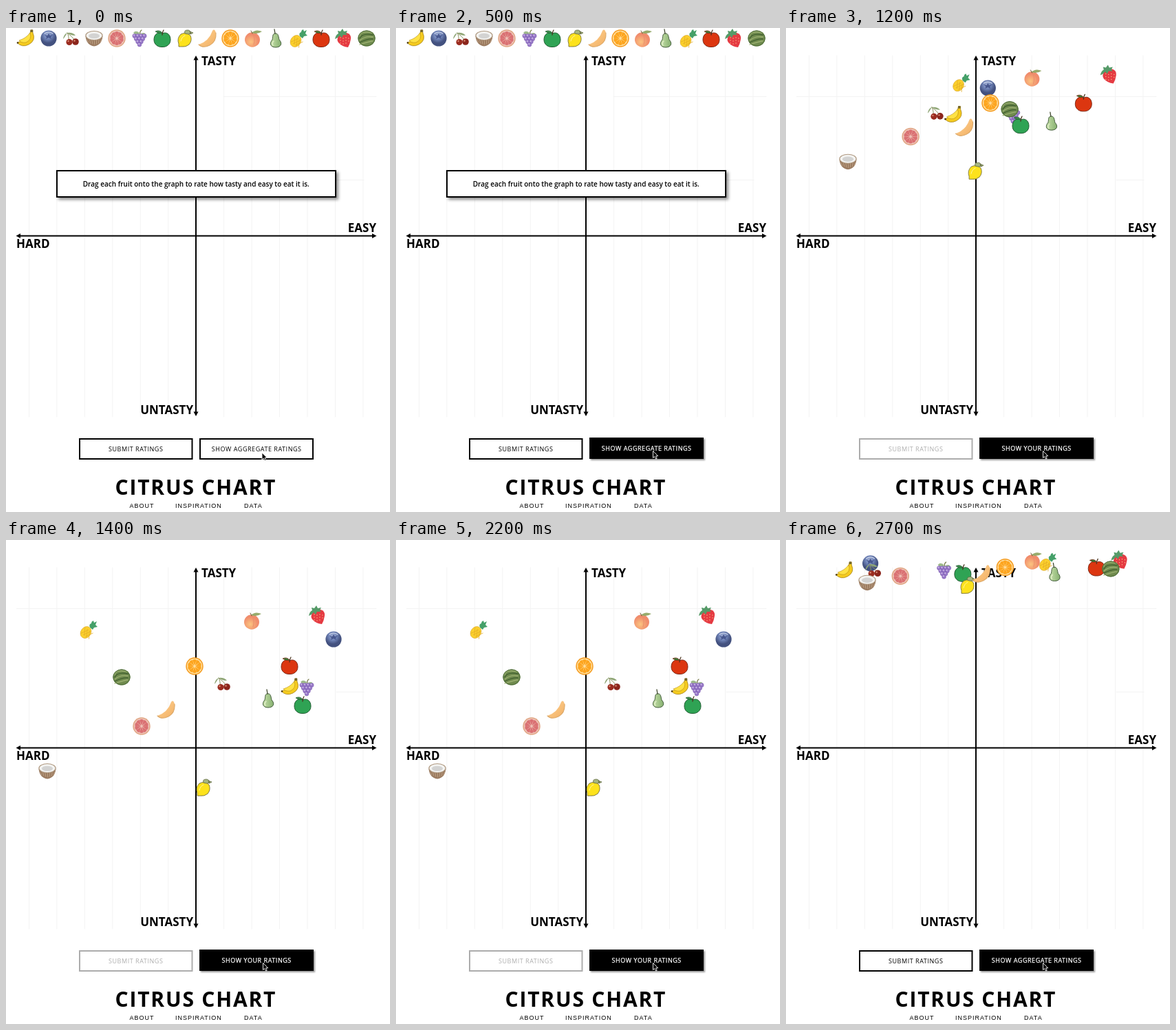
These frames come from a looping animation (558x702 px, 2.8 s). An HTML page:

```html
<!DOCTYPE html>
<html lang="en">
<head>
<meta charset="utf-8">
<title>Citrus Chart</title>
<style>
html, body { margin: 0; width: 100%; height: 100%; overflow: hidden; background: #fff; }
svg { display: block; }
text { font-family: "Open Sans", sans-serif; fill: #000; }
.axis { font-size: 17px; font-weight: 700; }
.label { font-size: 9px; letter-spacing: .55px; text-anchor: middle; }
.nav text { font: 9px "Liberation Sans", Arial, sans-serif; letter-spacing: 1px; }
.raised { filter: drop-shadow(3px 3px 2px rgba(0,0,0,.45)); }
</style>
</head>
<body>
<svg id="stage" width="558" height="702" viewBox="0 0 558 702">
  <defs>
    <radialGradient id="berry" cx=".45" cy=".3"><stop stop-color="#a9b6d8"/><stop offset=".5" stop-color="#7084b8"/><stop offset="1" stop-color="#43517f"/></radialGradient>
    <radialGradient id="peach" cx=".4" cy=".65"><stop stop-color="#fbc480"/><stop offset="1" stop-color="#f08c6c"/></radialGradient>
    <linearGradient id="melon" x2="1" y2="1"><stop stop-color="#fdd294"/><stop offset="1" stop-color="#f3b063"/></linearGradient>
    <linearGradient id="pear" x2="1"><stop stop-color="#c5dfa8"/><stop offset="1" stop-color="#86b070"/></linearGradient>
  </defs>
  <rect width="558" height="702" fill="#fff"/>
  <g id="grid"></g>
  <path id="leftRule" d="M15 99.500H316" stroke="#f3f3f3"/>
  <path d="M276 44V560M18 301.500H535" stroke="#000" stroke-width="2"/>
  <path d="M276 40l3.500 6.500h-7zM276 563l3.500-6.500h-7zM14.500 301.500l6.500-3.500v7zM538.500 301.500l-6.500-3.500v7z"/>
  <g class="axis">
    <text x="284" y="54">TASTY</text>
    <text x="538" y="296" text-anchor="end">EASY</text>
    <text x="15" y="319">HARD</text>
    <text x="272" y="559.500" text-anchor="end">UNTASTY</text>
  </g>
  <g id="hint">
    <rect class="raised" x="74" y="207" width="405" height="38" fill="#fff" stroke="#000" stroke-width="2"/>
    <text x="276.300" y="230" font-size="10" font-weight="600" text-anchor="middle">Drag each fruit onto the graph to rate how tasty and easy to eat it is.</text>
  </g>
  <g id="fruits"></g>
  <g id="submit">
    <rect x="107" y="596" width="163.500" height="29" fill="none" stroke="#000" stroke-width="2"/>
    <text class="label" x="188.700" y="614">SUBMIT RATINGS</text>
  </g>
  <g id="toggle">
    <rect x="282" y="596" width="164" height="29" stroke="#000" stroke-width="2"/>
    <text class="label" x="364.200" y="614"></text>
  </g>
  <path id="cursor" d="M0 0V10L2.300 8 4 11.500 5.700 10.800 4.200 7.300H7.200Z" fill="#000" stroke="#fff" stroke-width=".9"/>
  <text x="158.500" y="677" font-size="30" font-weight="700" letter-spacing="1.800">CITRUS CHART</text>
  <g class="nav">
    <text x="179.500" y="696">ABOUT</text>
    <text x="246" y="695.500">INSPIRATION</text>
    <text x="346" y="696">DATA</text>
  </g>
</svg>
<script>
const $ = id => document.getElementById(id);
const range = (n, f) => Array.from({ length: n }, (_, i) => f(i)).join('');
const path = (d, fill, more = '') => `<path d="${d}" fill="${fill}" ${more}/>`;
const oval = (x, y, rx, ry, fill, more = '') =>
  `<ellipse cx="${x}" cy="${y}" rx="${rx}" ry="${ry}" fill="${fill}" ${more}/>`;
const dot = (x, y, r, fill, more) => oval(x, y, r, r, fill, more);
const line = (d, color, w = 1) => path(d, 'none', `stroke="${color}" stroke-width="${w}" stroke-linecap="round"`);
const ink = (color, w = 1) => `stroke="${color}" stroke-width="${w}"`;

const citrus = (rind, pith, flesh, n) =>
  dot(0, 0, 12.7, rind) + dot(0, 0, 11.2, pith) +
  range(n, i => path('M0 -1.2L2.9 -8.8Q0 -11.2 -2.9 -8.8Z', flesh, `transform="rotate(${i * 360 / n})"`));

const apple = (body, edge, leaf) =>
  path('M0 -7C-6 -10 -12 -6 -12 2C-12 9 -6 13 0 12.5C6 13 12 9 12 2C12 -6 6 -10 0 -7Z', body, ink(edge)) +
  line('M0 -5Q0 -9 2 -12', '#4b3420', 1.3) +
  path('M0 -8Q-4 -13 -10 -10Q-5 -6 0 -8Z', leaf, ink(edge, .7));

const banana =
  path('M-13 6Q0 4 6 -8L7 -12L10 -12L10 -8Q15 3 4 9Q-6 14 -13 6Z', '#f5cb1f', ink('#9a7718', .7)) +
  path('M-10 3Q0 0 6 -8Q9 2 0 6Q-7 7 -10 3Z', '#ffe245', ink('#b58c15', .6)) +
  path('M6.500 -9V-12.500H10V-9Z', '#74672a') + dot(-12, 6.5, 1.3, '#4c3b18');

const blueberry =
  dot(0, 0, 11.6, 'url(#berry)') +
  path('M-6 -5L-2 -4L0 -7L2 -4L6 -5L3 -2L4 1L0 -1L-4 1L-3 -2Z', '#48588f') +
  line('M-6 -7Q0 -11 6 -7', '#cdd6ea', 1.2);

const cherries =
  line('M-4 5Q-3 -3 -6 -8M6 4Q1 -3 -6 -8', '#8b9160') +
  path('M-6 -8Q-10 -1 -12 1Q-11 -6 -6 -8ZM-6 -8Q2 -9 6 -4Q-1 -4 -6 -8Z', '#8fa676') +
  dot(-3, 5.5, 4.6, '#9b2c20') + dot(6, 5, 4.8, '#8b251c') +
  dot(-4.5, 4, 1.2, '#d98a72') + dot(4.5, 3.5, 1.2, '#d98a72');

const coconut =
  path('M-12.500 -3Q-11 10 0 11.500Q11 10 12.500 -3Z', '#9b7b60') +
  range(7, i => line(`M${i * 3.4 - 10} 2l${2 - i * .5} ${7 - Math.abs(i - 3)}`, '#c4a98c', .8)) +
  oval(0, -4, 12.7, 7, '#b09a82') + oval(0, -4, 11.5, 6, '#f4f4f2') + oval(0, -3.5, 8, 3.8, '#d3d3d2');

const grapes =
  line('M1 -6Q0 -10 3 -12', '#7c8050', 1.3) +
  path('M1 -7Q-5 -13 -9 -8Q-6 -4 1 -7ZM2 -7Q8 -10 9 -5Q5 -3 2 -7Z', '#9fbb8b') +
  range(4, r => range(4 - r, c => {
    const x = c * 4.8 - (3 - r) * 2.4, y = r * 4.2 - 3.5;
    return dot(x, y, 2.9, '#9b7cca', ink('#7657ad', .6)) + dot(x - .8, y - 1, 1, '#d3c1ea');
  }));

const lemon =
  path('M-9 8Q-12 0 -6 -6Q2 -10 8 -4Q11 3 6 9Q1 13 -4 12L-9 12Z', '#fde21c', ink('#77713c', .9)) +
  path('M0 -7Q-2 -12 4 -12Q8 -12 9 -7Q5 -5 0 -7ZM7 -10L12 -8L8 -6Z', '#a5b581', ink('#626b40', .8)) +
  line('M-6 4Q-5 -2 0 -4', '#fff6a0');

const melon =
  path('M-13 9Q2 4 7 -11Q10 -15 12 -8Q13 5 3 10Q-7 15 -13 9Z', 'url(#melon)') +
  line('M-13 9Q-7 15 3 10Q13 5 12 -8', '#dba869', 1.1);

const peach =
  oval(-1, 2, 11, 10.7, 'url(#peach)') +
  line('M-1 -8Q4 0 1 9', '#e98f6b', 1) +
  path('M-2 -8Q4 -14 13 -10Q6 -5 -2 -8Z', '#98ab6c') + line('M-1 -7L-3 -11', '#76603b');

const pear =
  path('M-1 -7C4 -8 4 -2 5 2C10 7 8 13 0 13C-9 13 -9 6 -5 2C-4 -2 -5 -7 -1 -7Z', 'url(#pear)', ink('#425b3b')) +
  line('M-1 -7L-2 -13', '#3f482e', 1.3) + line('M-3 4Q-6 7 -4 10', '#e5f0cc', 1.3);

const pineapple =
  path('M2 -3Q0 -8 4 -9Q4 -12 7 -13L8 -10L12 -12L10 -7L13 -4L8 -3L6 0Z', '#45a069') +
  `<g transform="rotate(35 -4 4)">${oval(-4, 4, 7.3, 9, '#fbd02c', ink('#dba42a', .6))}` +
  range(3, i => line(`M${i * 4 - 9} -1l6 10M${i * 4 - 3} -1l-6 10`, '#e3ac27', .7)) + '</g>';

const strawberry =
  path('M-8 -3Q-4 -9 4 -8Q11 -6 10 1Q9 8 6 13Q-3 12 -8 6Q-11 2 -8 -3Z', '#e53a42') +
  range(11, i => dot(-5 + i % 4 * 4, -1 + (i >> 2) * 4 + i % 2, .65, '#ffc48a')) +
  path('M-13 1Q-12 -5 -8 -7L-9 -11L-5 -10L-2 -14L0 -10L5 -11L3 -7L5 -5L-1 -5L-3 -1L-6 -4L-9 -1Z', '#559a68');

const watermelon =
  oval(0, 0, 12.6, 11.5, '#708b4e') +
  range(5, i => line(`M-10 ${i * 3 - 3}Q${i * 4 - 10} ${i * 4 - 12} 9 ${i * 3 - 8}`, i % 2 ? '#3e5d2e' : '#9db173', 1.3)) +
  oval(0, 0, 12.1, 11, 'none', ink('#4c6b38', 1));

// Rated position, then artwork
const items = [
  [413, 213, banana], [476, 144, blueberry], [315, 208, cherries], [60, 335, coconut],
  [197, 270, citrus('#e0a583', '#efc5b9', '#da7173', 10)], [437, 214, grapes],
  [431, 239, apple('#2fa354', '#225b32', '#3a8a49')], [287, 359, lemon], [233, 246, melon],
  [274, 183, citrus('#f59a1c', '#ffe0a3', '#fda51f', 10)], [358, 117, peach],
  [381, 230, pear], [120, 130, pineapple],
  [412, 182, apple('#dc3610', '#7d2815', '#3c7b37')], [453, 109, strawberry], [168, 199, watermelon]
];

$('fruits').innerHTML = items.map(f => `<g>${f[2]}</g>`).join('');
$('grid').innerHTML = range(13, i => line(`M${33.5 + i * 40.45} 40V564`, '#f3f3f3')) +
  line('M316 99.500H538M480 220.500H520', '#f3f3f3');

const LOOP = 2800, MOVE = 400, OPEN = 985, CLOSE = 2400;
const clamp = v => Math.max(0, Math.min(1, v));
const swing = v => .5 - Math.cos(Math.PI * clamp(v)) / 2;
const within = (t, a, b) => t >= a && t < b;
const tone = v => `rgb(${v},${v},${v})`;

const nodes = [...$('fruits').children];
const [box, caption] = $('toggle').children;

function draw(t) {
  const k = swing((t - OPEN) / MOVE) - swing((t - CLOSE) / MOVE);
  items.forEach(([x, y], i) => {
    const home = 29 + 33 * i;
    nodes[i].setAttribute('transform', `translate(${home + (x - home) * k} ${15 + (y - 15) * k})`);
  });

  const rated = within(t, OPEN, CLOSE);
  const pressed = within(t, 800, 1000) || within(t, 2300, 2400);
  const hover = clamp(t / 200);
  const shade = Math.round(255 * (1 - hover));
  const depth = pressed ? 1 : 2;

  $('hint').style.display = t < OPEN ? '' : 'none';
  $('leftRule').style.display = t < 700 ? 'none' : '';
  $('submit').setAttribute('opacity', rated ? .32 : 1);
  caption.textContent = rated ? 'SHOW YOUR RATINGS' : 'SHOW AGGREGATE RATINGS';
  caption.style.fill = tone(255 - shade);
  caption.style.stroke = hover ? tone(255 - shade) : 'none';
  caption.style.strokeWidth = .25;
  box.setAttribute('fill', tone(shade));
  box.style.filter = hover ? `drop-shadow(${depth}px ${depth}px 1px rgba(0,0,0,${.4 * hover}))` : 'none';
  $('toggle').setAttribute('transform', `translate(0 ${pressed ? 0 : -hover})`);
  $('cursor').setAttribute('transform', t < 100 ? 'translate(372 616)' : 'translate(373.5 613.5)');
}

const start = performance.now();
function tick() {
  const t = (performance.now() - start) % LOOP;
  draw(Math.floor(t / 100) * 100);
  requestAnimationFrame(tick);
}
tick();
</script>
</body>
</html>
```
